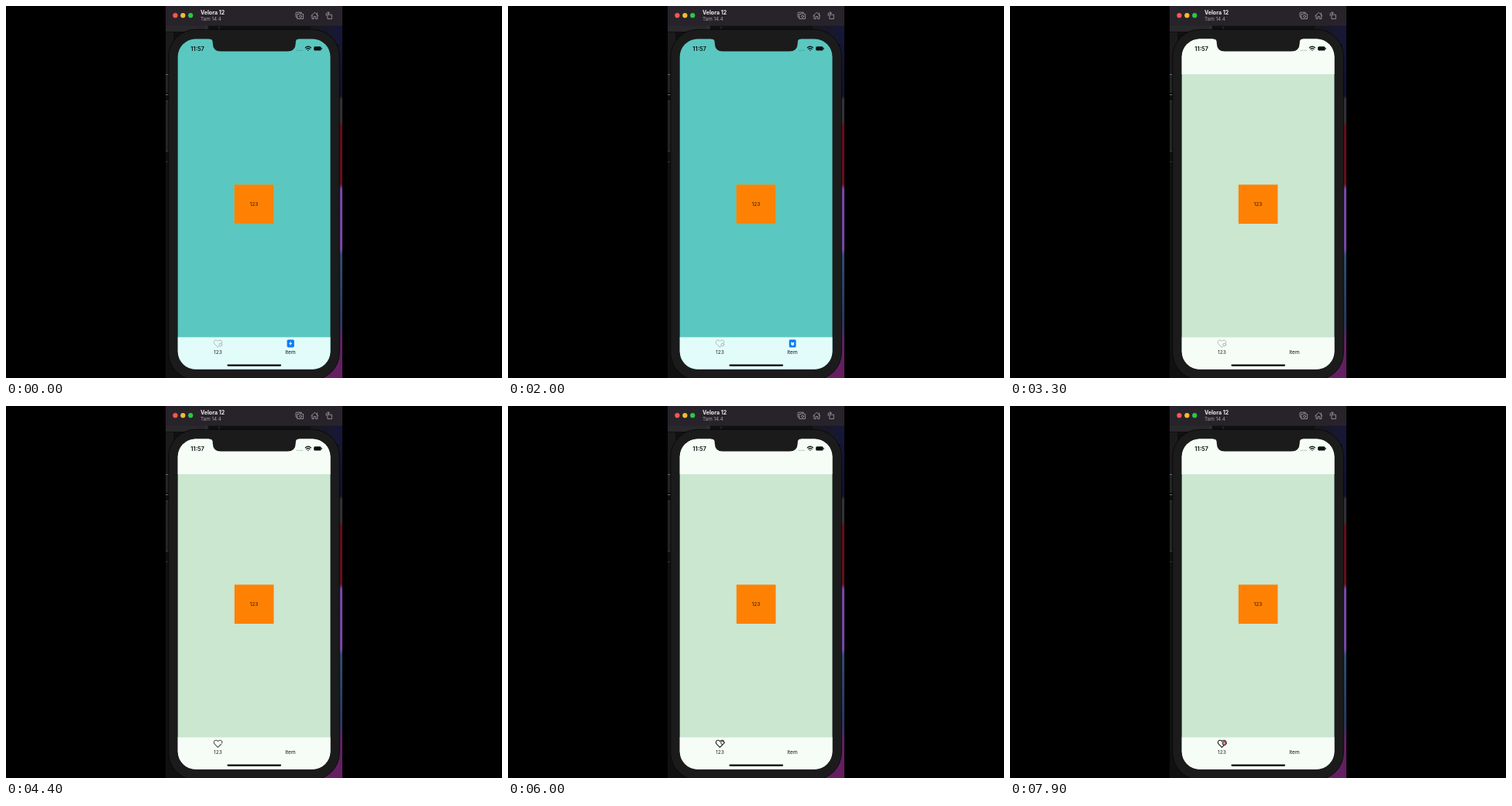
An HTML page that plays this animation: 640 px wide and 480 px high, repeating every 8000 ms.

```html
<!DOCTYPE html>
<html lang="en">
<head>
<meta charset="utf-8">
<title>Tab bar icon demo</title>
<style>
html, body { margin: 0; width: 100%; height: 100%; overflow: hidden; background: #000; }
svg { display: block; width: 100vw; height: 100vh; }
text { font-family: Inter, Roboto, sans-serif; }
.tool { fill: none; stroke: #aaa5ac; stroke-width: .8; stroke-linejoin: round; stroke-linecap: round; }
.line { fill: none; stroke-linecap: round; stroke-linejoin: round; }
.mid { text-anchor: middle; }
</style>
</head>
<body>
<svg viewBox="0 0 640 480">
  <defs>
    <linearGradient id="edge" x2="0" y2="1">
      <stop offset="0" stop-color="#17173a"/>
      <stop offset=".2" stop-color="#11132e"/>
      <stop offset=".21" stop-color="#333136"/>
      <stop offset=".275" stop-color="#333136"/>
      <stop offset=".285" stop-color="#650d1b"/>
      <stop offset=".45" stop-color="#65101f"/>
      <stop offset=".465" stop-color="#7646a8"/>
      <stop offset=".635" stop-color="#7846a9"/>
      <stop offset=".65" stop-color="#314b73"/>
      <stop offset=".84" stop-color="#27385f"/>
      <stop offset=".9" stop-color="#631f61"/>
      <stop offset="1" stop-color="#7a2370"/>
    </linearGradient>
    <linearGradient id="sky">
      <stop offset="0" stop-color="#18181b"/>
      <stop offset="1" stop-color="#17173a"/>
    </linearGradient>
    <clipPath id="glass"><rect x="221.7" y="42.5" width="196.8" height="426.3" rx="23"/></clipPath>
    <path id="heart" d="M273.4 440.3L269.3 436.3C267.2 434 268.5 431.2 271 431.2Q272.6 431.2 273.5 432.7Q274.4 431.2 276.1 431.2C278.3 431.2 279.4 433.3 278.6 435"/>
  </defs>

  <rect width="640" height="480"/>

  <!-- desktop around the device -->
  <rect x="206" y="25" width="228" height="455" fill="#101011"/>
  <rect x="206" y="25" width="55" height="8" fill="#29292b"/>
  <rect x="206" y="34" width="10" height="54" fill="#1b1b1d"/>
  <path d="M206 88h5v24h-5zM206 122h5v33h-5zM206 157h5v30h-5z" fill="#242426"/>
  <path d="M206 88.5h5M206 114.5h5" stroke="#67676a"/>
  <path d="M206 122.5h5M206 156h5M206 187.5h5M206 201h5" stroke="#37373a"/>
  <path d="M258 26v6M275 26v6" stroke="#444447" stroke-width=".7"/>
  <rect x="393" y="25" width="41" height="24" fill="url(#sky)"/>
  <rect x="429" y="25" width="5" height="455" fill="url(#edge)"/>
  <rect x="410" y="440" width="24" height="40" fill="#631f61"/>

  <!-- title bar -->
  <path d="M206 0H434V25.5H206z" fill="#28232b"/>
  <circle cx="218.4" cy="12.2" r="3.1" fill="#f9574f"/>
  <circle cx="228.3" cy="12.2" r="3.1" fill="#f9b92e"/>
  <circle cx="238.2" cy="12.2" r="3.1" fill="#2bc840"/>
  <text x="251" y="11.2" font-size="7" font-weight="700" fill="#f0edf0">Velora 12</text>
  <text x="251" y="18.6" font-size="6.3" fill="#a6a1a9">Tam 14.4</text>
  <g class="tool">
    <path d="M375.8 14.5H374.8Q374 14.5 374 13.7V9Q374 8.2 374.8 8.2H380.8Q381.6 8.2 381.6 9"/>
    <path d="M376.2 10.5h2l.6-.9h2.6l.6.9h1.6v6h-7.4z"/>
    <circle cx="380.1" cy="13.4" r="1.5"/>
    <path d="M393.8 12.7L398.4 8.4L403 12.7M395 12v4.6h2.2v-3h2.4v3h2.2V12M401.4 10.8V8.9"/>
    <path d="M415.3 11.2h5v5.4h-5zM413.2 12.3V10Q413.2 9 414.2 9H417M415.6 7.5L417.2 9L415.6 10.4"/>
  </g>

  <!-- device -->
  <rect x="209.8" y="30.3" width="220.6" height="452" rx="35" fill="#1b1b1c" stroke="#070707" stroke-width=".8"/>
  <g clip-path="url(#glass)">
    <rect id="page" x="221" y="42" width="198" height="428"/>
    <rect id="header" x="221" y="42" width="198" height="46"/>
    <rect id="bar" x="221" y="427.3" width="198" height="42"/>
    <path d="M221 427.3H419" stroke="#a9bebc" stroke-width=".3" opacity=".5"/>
  </g>
  <path d="M262 41H378V42.5Q374 42.5 373.8 46.5V48Q373.5 58.6 363 58.6H277Q267 58.6 266.7 48V46.5Q266.5 42.5 262 42.5z" fill="#1b1b1c"/>

  <!-- status bar -->
  <text x="238.3" y="57.6" font-size="7.5" font-weight="600" fill="#0b1212">11:57</text>
  <path d="M375 57.3H383" stroke="#31504e" stroke-dasharray="1.2 1" opacity=".5"/>
  <g class="line" stroke="#0a1010" stroke-width="1.2">
    <path d="M386.4 53.8Q389.9 50.7 393.4 53.8M387.8 55.5Q389.9 53.8 392 55.5"/>
    <path d="M389.9 57.2v.1" stroke-width="1.5"/>
  </g>
  <rect x="397.2" y="52.3" width="9.5" height="5.2" rx="1.5" fill="#0a1010"/>
  <path d="M407.5 54v1.8" stroke="#0a1010" stroke-width=".8"/>

  <rect x="294.8" y="230.5" width="50.7" height="50.5" fill="#ff8103"/>
  <rect id="rim" x="294.8" y="230.5" width="50.7" height="50.5" fill="none" stroke="#c2a94a" stroke-width=".6"/>
  <text class="mid" x="320" y="258.2" font-size="6.7" fill="#2c1a08">123</text>

  <!-- tab bar -->
  <g class="line">
    <g id="pale" stroke="#a5b1b0" stroke-width=".9">
      <use href="#heart"/>
      <circle cx="276.8" cy="437" r="1.9"/>
      <path d="M273.4 440.3L275 438.8"/>
    </g>
    <g id="dark" stroke="#1d1d1d" stroke-width="1.1">
      <use href="#heart"/>
      <path d="M273.4 440.3L277.4 436.5"/>
    </g>
    <circle id="badge" r="2" stroke="#1d1d1d" stroke-width=".9"/>
    <path id="tick" d="M275.4 434.8l1 1l1.5-1.8" stroke="#fff" stroke-width=".6"/>
  </g>
  <g id="item">
    <rect x="362.6" y="430.4" width="9.2" height="10.1" rx="1.7" fill="#0a7cf6"/>
    <path id="notch" d="M362.5 433v.1M362.5 435.5v.1M362.5 438v.1M371.9 433v.1M371.9 435.5v.1M371.9 438v.1" class="line" stroke="#e2fcfa"/>
    <path id="bolt" d="M368.2 432.6L365 436h1.8l-.7 2.6l3.2-3.5h-1.8z" fill="#fff"/>
    <path id="mark" d="M365 433.5l2.2.9l2.2-.9l-.5 2.2l.5 1l-2.2 1.8l-2.2-1.8l.5-1z" fill="#fff"/>
  </g>
  <text class="mid" x="273.4" y="449" font-size="6.5" fill="#222">123</text>
  <text class="mid" x="366.9" y="449" font-size="6.5" fill="#111">Item</text>
  <path d="M286.5 463.6H354" class="line" stroke="#050505" stroke-width="2.3"/>
</svg>
<script>
const LOOP = 8000, SWITCH = 3250;
const el = Object.fromEntries([...document.querySelectorAll('[id]')].map(n => [n.id, n]));

const set = (node, attrs) => {
  for (const key in attrs) node.setAttribute(key, attrs[key]);
};
const ramp = (t, from, to) => {
  const x = Math.min(1, Math.max(0, (t - from) / (to - from)));
  return x * x * (3 - 2 * x);
};
const mix = (a, b, x) => a + (b - a) * x;
const blend = (a, b, x) => `rgb(${a.map((v, i) => Math.round(mix(v, b[i], x)))})`;

function drawTheme(first) {
  set(el.page, { fill: first ? '#5ac8c0' : '#cbe7d0' });
  set(el.header, { fill: '#f5fdf6', opacity: first ? 0 : 1 });
  set(el.bar, { fill: first ? '#e2fcfa' : '#f5fdf6' });
  set(el.rim, { opacity: first ? 1 : 0 });
  set(el.item, { opacity: first ? 1 : 0 });
}

function drawItem(t) {
  const x = ramp(t, 50, 650);
  set(el.notch, { 'stroke-width': 1.1 * x, opacity: x });
  set(el.bolt, { opacity: 1 - x });
  set(el.mark, { opacity: x });
}

function drawHeart(t) {
  const ink = ramp(t, 3400, 4900);
  const drop = ramp(t, 5400, 6400);
  const pink = ramp(t, 5700, 6600);
  const red = ramp(t, 6800, 7900);
  set(el.pale, { opacity: 1 - ink });
  set(el.dark, { opacity: ink });
  set(el.badge, {
    cx: mix(277.2, 276.6, drop),
    cy: mix(432.9, 435.2, drop),
    r: mix(1.5, 2.5, drop),
    opacity: ramp(t, 4500, 5300),
    fill: blend([245, 253, 246], red ? [mix(240, 232, red), mix(172, 112, red), mix(155, 105, red)] : [240, 172, 155], pink)
  });
  set(el.tick, { opacity: pink * .7 });
}

function draw(t) {
  drawTheme(t < SWITCH);
  drawItem(t);
  drawHeart(t);
}

const start = performance.now();
function tick() {
  draw((performance.now() - start) % LOOP);
  requestAnimationFrame(tick);
}
tick();
</script>
</body>
</html>
```
